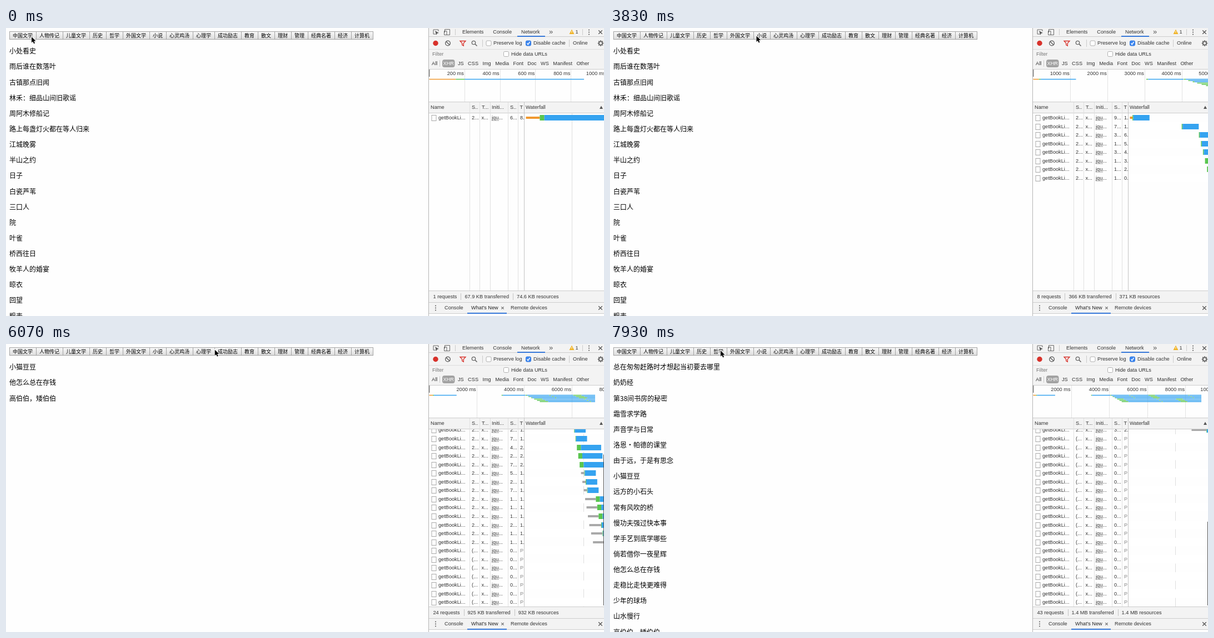
Recreate the animation shown at these times as an HTML page with a canvas. Size 1076 px wide and 520 px high, loop 8000 ms.

```html
<!DOCTYPE html>
<html lang="zh">
<head>
<meta charset="utf-8">
<style>
html, body { margin: 0; width: 1076px; height: 520px; overflow: hidden; background: #fff; }
canvas { display: block; width: 1076px; height: 520px; }
</style>
</head>
<body>
<canvas id="stage"></canvas>
<script>
const canvas = document.getElementById('stage'), c = canvas.getContext('2d');
const ratio = window.devicePixelRatio || 1;
canvas.width = 1076 * ratio;
canvas.height = 520 * ratio;

const CJK = '"Noto Sans CJK SC", "Noto Sans CJK", sans-serif';
const UI = '9.2px "Liberation Sans", Arial, sans-serif';
const BLUE = '#35a3f0', GREEN = '#5ac54f', ORANGE = '#f0982f', GREY = '#a9a9a9';
const LOOP = 8000, ROW = 15.55, TOP = 154, VIEW = 320;

// Refreshes come in bursts (from, to, count) that slow down slightly
const ticks = [[0, 0, 1], [150, 1050, 6], [1200, 1340, 2], [1640, 2570, 7], [2750, 3650, 6],
  [3830, 4340, 4], [4610, 5510, 6], [5720, 6680, 6], [6890, 7930, 6]]
  .flatMap(([a, b, n]) => Array.from({ length: n }, (_, i) =>
    a + Math.floor((b - a) * (i / (n - 1 || 1)) ** 1.1 / 10) * 10));

const tabs = '中国文学 人物传记 儿童文学 历史 哲学 外国文学 小说 心灵鸡汤 心理学 成功励志 教育 散文 理财 管理 经典名著 经济 计算机'.split(' ');

const lists = [
  [0, '小处看史|雨后谁在数落叶|古镇那点旧闻|林禾：细品山间旧歌谣|周阿木修船记|路上每盏灯火都在等人归来|江城晚雾|半山之约|日子|白瓷芦苇|三口人|院|叶雀|桥西往日|牧羊人的婚宴|晾衣|回望|粗麦'],
  [4010, '总在匆匆赶路时才想起当初要去哪里|守塔人随笔集|清晨面包房偶遇一位先生|采茶姑娘海上之行|静的学问|茶叶录|日子大抵这样|日子的茶席|松林岭后面的磨坊|谁拿走他的雨伞?|青石湾畔|阿兰的花园|曲与直|蓝衣少年'],
  [5150, '小猫豆豆|他怎么总在存钱|高伯伯，矮伯伯'],
  [6290, '日子像是不息的河流|最暖的灯火在窗前|由于看见 于是温柔|雨后谁在数落叶|林禾：细品山间旧歌谣|他们一直结伴远行|路上每盏灯火都在等人归来|三口人|这些孩子想问的话|回望|日子大抵这样|绕岭|日子的茶席|不忘青山不忘君|她想念那时想念他的她|三载骑行河谷|远方的小石头|花鸟的后花园'],
  [7520, '总在匆匆赶路时才想起当初要去哪里|奶奶经|第38间书房的秘密|霜雪求学路|声音学与日常|洛恩·帕德的课堂|由于远，于是有思念|小猫豆豆|远方的小石头|常有风吹的桥|慢功夫强过快本事|学手艺到底学哪些|倘若借你一夜星辉|他怎么总在存钱|走稳比走快更难得|少年的球场|山水慢行|高伯伯，矮伯伯']
].map(([at, text]) => [at, text.split('|')]);

function sample(keys, t) {
  const i = keys.findIndex(k => k[0] > t);
  if (i === 0) return keys[0].slice(1);
  if (i < 0) return keys[keys.length - 1].slice(1);
  const a = keys[i - 1], b = keys[i], p = (t - a[0]) / (b[0] - a[0]);
  return a.slice(1).map((v, j) => v + (b[j + 1] - v) * p);
}

// Six connections: a request waits for a free one, then loads for a short or a long time
const clickKeys = [[0, 0], [1, 3.04], [2, 4.05], [14, 5.48], [27, 7.55], [42, 8.8]];
const free = Array(6).fill(0);
const requests = Array.from({ length: 43 }, (_, i) => {
  const start = sample(clickKeys, i)[0], slow = i > 1 && (i + 4) % 6 > 2;
  const idle = free.findIndex(end => end <= start);
  const lane = idle < 0 ? free.indexOf(Math.min(...free)) : idle;
  const sent = i ? Math.max(start, free[lane]) : .15;
  const end = free[lane] = sent + (slow ? 2.1 : 1);
  return { start, sent, reply: sent + (slow ? .35 : .05), end, lane, size: 9.8 - i * 2.6 % 8 };
});

// Seconds on the network timeline; it rests between the first two requests
const clock = t => t < 2.15 ? Math.min(t + .873, 1.2) : t + .9;

const trafficKeys = [[0, 67.9, 74.6], [.35, 97.5, 97.1], [2.2, 97.5, 97.1], [2.9, 177, 176], [4.61, 524, 535],
  [5.51, 764, 777], [6.68, 1100, 1100], [7.93, 1400, 1400]];
const cursorKeys = [[0, 46, 16], [1.05, 22, 36], [1.34, 80, 42], [1.79, 83, 45], [2.09, 46, 16], [2.95, 46, 16],
  [3.65, 190, 14], [4.61, 582, 16], [4.97, 645, 14], [5.51, 415, 8], [6.68, 333, 13], [7.93, 199, 12]];

function rect(x, y, w, h, color) {
  c.fillStyle = color;
  c.fillRect(x, y, w, h);
}
function text(s, x, y, color = '#333', font = UI, align = 'left') {
  c.font = font;
  c.fillStyle = color;
  c.textAlign = align;
  c.fillText(s, x, y + .5);
}
function path(points, color, width = 1, close = false) {
  c.beginPath();
  points.forEach(([x, y]) => c.lineTo(x, y));
  if (close) c.closePath();
  c.strokeStyle = color;
  c.lineWidth = width;
  c.stroke();
}
function shape(points, color) {
  c.beginPath();
  points.forEach(([x, y]) => c.lineTo(x, y));
  c.fillStyle = color;
  c.fill();
}
function ring(x, y, r, color, width) {
  c.beginPath();
  c.arc(x, y, r, 0, 7);
  c.strokeStyle = color;
  c.lineWidth = width;
  c.stroke();
}
function dot(x, y, r, color) {
  c.beginPath();
  c.arc(x, y, r, 0, 7);
  c.fillStyle = color;
  c.fill();
}
function box(x, y, w, h, fill, line) {
  rect(x, y, w, h, line);
  rect(x + 1, y + 1, w - 2, h - 2, fill);
}
function clip(x, y, w, h, draw) {
  c.save();
  c.beginPath();
  c.rect(x, y, w, h);
  c.clip();
  draw();
  c.restore();
}
function cross(x, y, r, color = '#555', width = 1.3) {
  path([[x - r, y - r], [x + r, y + r]], color, width);
  path([[x + r, y - r], [x - r, y + r]], color, width);
}
function menuDots(x, y) {
  for (const d of [-4, 0, 4]) dot(x, y + d, 1, '#555');
}
function checkbox(x, y, on) {
  c.beginPath();
  c.roundRect(x - 4.5, y - 4.5, 9, 9, 2);
  c.fillStyle = on ? '#3b86f0' : '#fff';
  c.fill();
  c.strokeStyle = on ? '#3479de' : '#b0b0b0';
  c.lineWidth = 1;
  c.stroke();
  if (on) path([[x - 2.5, y], [x - .7, y + 2.3], [x + 2.5, y - 2.5]], '#fff', 1.4);
}
// Words set in a row with one gap between them
function words(list, x, y, gap, between) {
  list.forEach((s, i) => {
    if (i && between) between(x - gap / 2);
    text(s, x, y);
    x += c.measureText(s).width + gap;
  });
}

function drawPage(ms) {
  let x = 6;
  const shade = c.createLinearGradient(0, 6, 0, 21);
  shade.addColorStop(0, '#fafafa');
  shade.addColorStop(1, '#dcdcdc');
  for (const tab of tabs) {
    const w = 9 * tab.length + 12;
    box(x, 6, w + 1, 15, shade, '#a3a3a3');
    text(tab, x + w / 2, 13, '#000', '9px ' + CJK, 'center');
    x += w;
  }
  const titles = lists.filter(l => l[0] <= ms).pop()[1];
  titles.forEach((s, i) => text(s, 6, 41.3 + 28.13 * i, '#000', '12px ' + CJK));
}

function drawToolbar() {
  rect(761, 0, 315, 74, '#f3f3f3');
  rect(760, 0, 1, 520, '#b5b5b5');
  rect(761, 15, 315, 1, '#ccc');
  rect(761, 38, 315, 1, '#dcdcdc');
  rect(761, 74, 315, 1, '#ccc');
  // Tab strip
  path([[774, 11], [769, 11], [769, 3], [778, 3], [778, 6]], '#666');
  shape([[772, 5], [779, 9], [776, 9.5], [774.5, 12.5]], '#555');
  path([[789.5, 8], [789.5, 2.5], [798.5, 2.5], [798.5, 12.5], [793, 12.5]], '#666');
  path([[788.5, 5.5], [793, 5.5], [793, 12.5], [788.5, 12.5]], '#666', 1, true);
  rect(808, 2, 1, 11, '#ccc');
  words(['Elements', 'Console', 'Network'], 821, 7, 17);
  rect(920, 14, 50, 2, '#3879d9');
  text('»', 977, 6.5, '#555', '13px "Liberation Sans", Arial, sans-serif');
  shape([[1018, 2.5], [1022.5, 11], [1013.5, 11]], '#f0b429');
  rect(1017.5, 5.5, 1, 3, '#fff');
  text('1', 1024.5, 7);
  rect(1037, 2, 1, 11, '#ccc');
  menuDots(1049, 7.5);
  cross(1069.5, 7.5, 3.3);
  // Recording controls
  dot(773, 27.5, 4.7, '#d8322b');
  ring(795, 27.5, 4.3, '#555', 1.3);
  path([[792, 24.5], [798, 30.5]], '#555', 1.3);
  path([[817, 23.5], [827, 23.5], [823.3, 27.5], [823.3, 32], [820.7, 30.5], [820.7, 27.5]], '#d8322b', 1.3, true);
  ring(841.5, 26.5, 3.2, '#666', 1.3);
  path([[844, 29], [847.5, 32.5]], '#666', 1.6);
  rect(857, 21, 1, 13, '#ccc');
  checkbox(868.5, 27.5, false);
  text('Preserve log', 877, 27);
  checkbox(940, 27.5, true);
  text('Disable cache', 949, 27);
  rect(1013, 21, 1, 13, '#ccc');
  text('Online', 1020, 27);
  ring(1070, 27.5, 3.2, '#666', 2);
  for (let a = 0; a < 8; a++) {
    const u = Math.cos(a * Math.PI / 4), v = Math.sin(a * Math.PI / 4);
    path([[1070 + 4 * u, 27.5 + 4 * v], [1070 + 5.4 * u, 27.5 + 5.4 * v]], '#666', 1.6);
  }
  // Filter rows
  text('Filter', 767, 47, '#777');
  checkbox(900, 47, false);
  text('Hide data URLs', 909, 47);
  text('All', 766, 64);
  rect(780, 58, 1, 12, '#ccc');
  c.beginPath();
  c.roundRect(785, 57, 22.5, 14, 4);
  c.fillStyle = '#a2a2a2';
  c.fill();
  text('XHR', 796.2, 64, '#fff', UI, 'center');
  words(['JS', 'CSS', 'Img', 'Media', 'Font', 'Doc', 'WS', 'Manifest', 'Other'], 813, 64, 7.4);
}

// The time window grows by a quarter whenever it is outrun
function overviewScale(T) {
  let span = .984;
  while (T > span) span *= 1.25;
  return 314 / span;
}

function drawOverview(t, T) {
  clip(761, 75, 315, 58, () => {
    // Labels catch up later than bars
    const grid = overviewScale(clock(t - .35)), px = overviewScale(clock(t - .1));
    const step = [200, 500, 1000, 2000].find(v => v * grid / 1000 > 45);
    for (let ms = step; ms < 12000; ms += step) {
      const x = 761 + ms * grid / 1000;
      rect(Math.round(x), 75, 1, 58, '#e3e3e3');
      text(ms + ' ms', x - 1, 82, '#333', UI, 'right');
    }
    requests.forEach((r, i) => {
      const bar = (a, b, color) => {
        b = Math.min(b, T);
        if (b > a) rect(761.5 + a * px, 91.8 + 2.3 * r.lane, (b - a) * px, 1.5, color);
      };
      if (!i) bar(r.start, r.sent, ORANGE);
      bar(r.sent, r.reply, GREEN);
      bar(r.reply, r.end, BLUE);
    });
    rect(761, 75, 1.5, 13, '#888');
  });
}

function drawRow(i, y, T, px) {
  const { start, sent, reply, end, size } = requests[i], mid = y + 8, done = T >= sent;
  if (i % 2) rect(933, y, 143, ROW, '#fff');
  box(765.5, mid - 5, 9, 11, '#fff', '#a8a8a8');
  text('getBookLi...', 778, mid);
  text(done ? '2...' : '(...', 838, mid);
  text('x...', 855.5, mid);
  text('jqu...', 874, mid);
  rect(874, mid + 4.5, 13, .8, '#777');
  const part = Math.min(1, (T - reply) / (end - reply)), life = Math.min(T, end) - start;
  text((done ? Math.max(1, Math.floor(size * part)) : 0) + '...', 907, mid);
  clip(922, y, 10, ROW, () => done
    ? text(Math.floor(life >= 1 ? life : life * 10) + '.', 925, mid)
    : text('P', 925, mid, '#888'));
  if (!done) return;
  const bar = (a, b, h, color) => {
    if (b > a) rect(935.5 + a * px, mid - h / 2, (b - a) * px, h, color);
  };
  bar(start, sent, 4, i ? GREY : ORANGE);
  bar(sent, reply, 10, GREEN);
  bar(reply, Math.min(end, T + .3), 10, BLUE);
}

function drawTable(T) {
  const count = requests.filter(r => r.start <= T).length, height = count * ROW;
  const scroll = Math.max(0, height - VIEW), px = 145 / T;
  rect(761, 133, 315, 21, '#f3f3f3');
  rect(761, 133, 315, 1, '#ccc');
  rect(761, 153, 315, 1, '#ccc');
  const unit = [.5, 1, 2, 5].find(v => v > T * .45) || 5;
  clip(761, TOP, 315, VIEW, () => {
    rect(Math.round(935 + unit * px), TOP, 1, VIEW, '#dedede');
    for (let i = 0; i < count; i++) drawRow(i, Math.round(TOP + i * ROW - scroll), T, px);
  });
  for (const x of [834, 852, 871, 903, 921]) rect(x, 134, 1, 340, '#e0e0e0');
  rect(932, 134, 1, 340, '#c4c4c4');
  [['Name', 764], ['S..', 838], ['T...', 856], ['Initi...', 874], ['S..', 907], ['T', 924.5], ['Waterfall', 935]]
    .forEach(([s, x]) => text(s, x, 143));
  shape([[1071, 140.5], [1074, 146], [1068, 146]], '#555');
  if (scroll) {
    const thumb = VIEW * VIEW / height;
    rect(1075, TOP + VIEW - thumb, 1, thumb - 2, '#555');
  }
  return count;
}

const amount = kb => kb >= 1000 ? (kb / 1000).toFixed(1) + ' MB' : kb.toFixed(kb < 100 ? 1 : 0) + ' KB';

function drawFooter(t, count) {
  rect(761, 474, 315, 41, '#f3f3f3');
  for (const y of [474, 495, 515]) rect(761, y, 315, 1, '#ccc');
  const [sent, held] = sample(trafficKeys, t);
  words([count + ' requests', amount(sent) + ' transferred', amount(held) + ' resources'], 768.5, 485, 14,
    x => rect(Math.round(x), 479, 1, 12, '#c4c4c4'));
  menuDots(773, 505.5);
  text('Console', 789, 505);
  text("What's New", 837, 505, '#222');
  cross(893.5, 505.5, 2.2, '#666', 1.1);
  rect(830, 514, 71, 2, '#3879d9');
  text('Remote devices', 908, 505);
  cross(1069.5, 505.5, 3.3);
}

function drawCursor(t) {
  const [x, y] = sample(cursorKeys, t);
  const arrow = [[0, 0], [0, 10.5], [2.4, 8.3], [4.1, 12.2], [6, 11.4], [4.3, 7.6], [7.6, 7.4]].map(([u, v]) => [x + u, y + v]);
  path(arrow, '#fff', 1.6, true);
  shape(arrow, '#000');
}

function frame(now) {
  const at = now % LOOP, ms = ticks.filter(v => v <= at).pop() || 0, t = ms / 1000, T = clock(t);
  c.setTransform(ratio, 0, 0, ratio, 0, 0);
  c.textBaseline = 'middle';
  rect(0, 0, 1076, 520, '#fefefe');
  drawPage(ms);
  drawToolbar();
  drawOverview(t, T);
  drawFooter(t, drawTable(T));
  drawCursor(t);
  requestAnimationFrame(frame);
}
requestAnimationFrame(frame);
</script>
</body>
</html>
```
